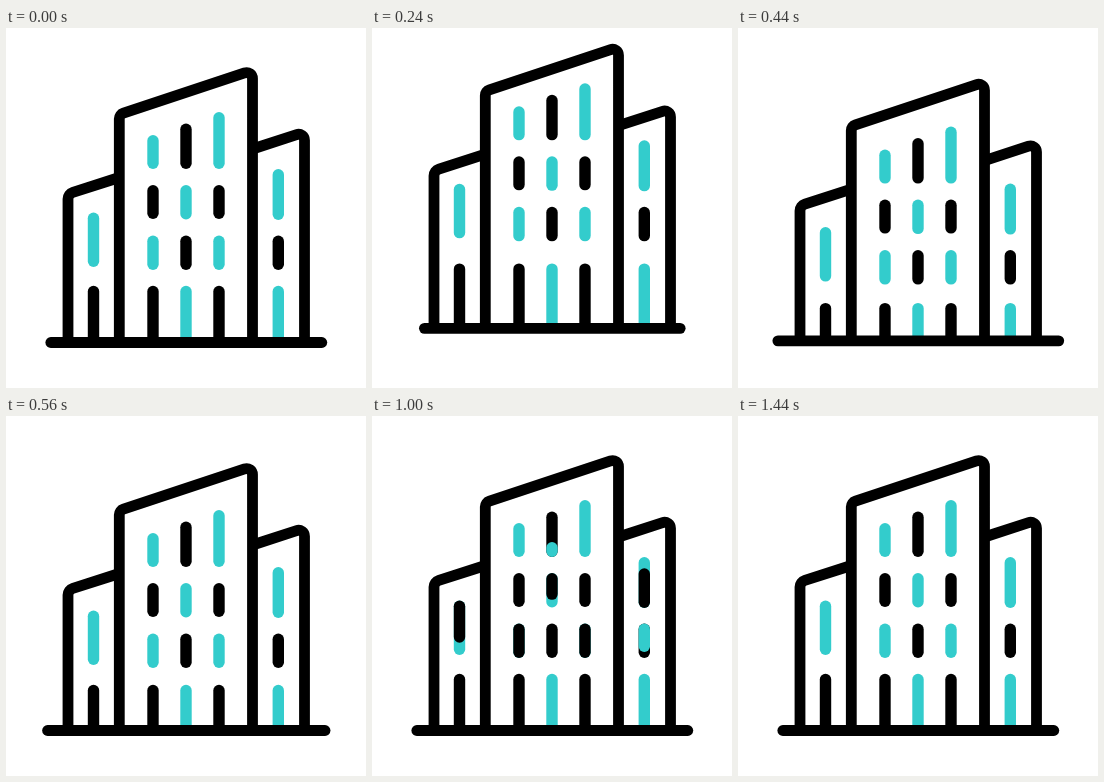
An HTML page with a canvas for the animation above (1480 ms loop, 360 by 360 pixels).

```html
<!DOCTYPE html>
<html lang="en">
<head>
<meta charset="utf-8">
<title>City buildings</title>
<style>
  html, body { margin: 0; width: 100%; height: 100%; overflow: hidden; background: #fff; }
  canvas { display: block; width: 360px; height: 360px; }
</style>
</head>
<body>
<canvas id="stage" width="360" height="360"></canvas>
<script>
const ctx = document.getElementById('stage').getContext('2d');
const LOOP = 1480, STEP = 40, WIPE = 150;
const BLACK = '#000', TEAL = '#33cccc';
const GROUND_Y = 314.5, GROUND_HALF = 135.5;
const WALL_WIDTH = 10.8, PANE_WIDTH = 11.4;

// x, top, bottom, colour, wipe start, un-wipe start
const panes = [
  [147, 107, 141, TEAL, 640, 800],
  [180, 95.5, 141, BLACK, 970, 1125],
  [213, 84, 141, TEAL, 625, 780],
  [147, 157, 191, BLACK, 1030, 1185],
  [180, 157, 191.5, TEAL, 792, 942],
  [213, 157, 191, BLACK, 1090, 1245],
  [147, 207.5, 242, TEAL, 845, 1000],
  [180, 207.5, 242, BLACK, 1135, 1290],
  [213, 207.5, 242, TEAL, 845, 1000],
  [87.5, 184.5, 239, TEAL, 758, 947],
  [272.3, 141, 192, TEAL, 903, 1060],
  [272.3, 207.5, 242, BLACK, 788, 950]
];
const doors = [[87.5, BLACK], [147, BLACK], [180, TEAL], [213, BLACK], [272.3, TEAL]];

const clamp = v => Math.min(1, Math.max(0, v));
const ease = v => { v = clamp(v); return v * v * (3 - 2 * v); };

// Rest, stretch at the peak, squash on landing, rest.
function jump(t, peak, squash) {
  if (t < 280) return peak * ease((t - 80) / 200);
  if (t < 480) return peak + (squash - peak) * ease((t - 280) / 200);
  return squash * (1 - ease((t - 480) / 160));
}

function line(x1, y1, x2, y2, color, width) {
  ctx.strokeStyle = color;
  ctx.lineWidth = width;
  ctx.beginPath();
  ctx.moveTo(x1, y1);
  ctx.lineTo(x2, y2);
  ctx.stroke();
}

function roof(points, radius) {
  ctx.strokeStyle = BLACK;
  ctx.lineWidth = WALL_WIDTH;
  ctx.beginPath();
  ctx.moveTo(...points[0]);
  for (let i = 1; i < points.length - 1; i++) {
    ctx.arcTo(...points[i], ...points[i + 1], radius);
  }
  ctx.lineTo(...points[points.length - 1]);
  ctx.stroke();
}

function drawPane([x, top, bottom, color, start, end], t, shift) {
  const inset = PANE_WIDTH / 2;
  const y1 = top + inset + shift, y2 = bottom - inset + shift;
  line(x, y1, x, y2, color, PANE_WIDTH);
  const head = ease((t - start) / WIPE), tail = ease((t - end) / WIPE);
  if (head > 0 && tail < 1) {
    const other = color === TEAL ? BLACK : TEAL;
    const at = p => y2 + (y1 - y2) * p;
    line(x, at(tail), x, at(head), other, PANE_WIDTH);
  }
}

function draw(t) {
  const roofShift = jump(t, -26, 16);
  const paneShift = jump(t, -32, 20);
  const doorShift = jump(t, -25, 22);
  const ground = GROUND_Y + jump(t, -15.8, 0);
  const half = GROUND_HALF + jump(t, -8.5, 6.5);

  ctx.fillStyle = '#fff';
  ctx.fillRect(0, 0, 360, 360);
  ctx.lineCap = 'round';

  for (const pane of panes) drawPane(pane, t, paneShift);
  for (const [x, color] of doors) {
    line(x, 263.5 + doorShift, x, ground - 1, color, PANE_WIDTH);
  }

  ctx.lineCap = 'butt';
  const up = y => y + roofShift;
  roof([[62, ground], [62, up(166)], [113.3, up(149.5)]], 7);
  roof([[298.5, ground], [298.5, up(104)], [246.5, up(121)]], 6);
  roof([[113.3, ground], [113.3, up(86.5)], [246.5, up(42.3)], [246.5, ground]], 6);

  ctx.lineCap = 'round';
  line(180.3 - half, ground, 180.3 + half, ground, BLACK, WALL_WIDTH);
}

function frame() {
  const t = performance.now() % LOOP;
  draw(Math.floor(t / STEP) * STEP);
  requestAnimationFrame(frame);
}
frame();
</script>
</body>
</html>
```
